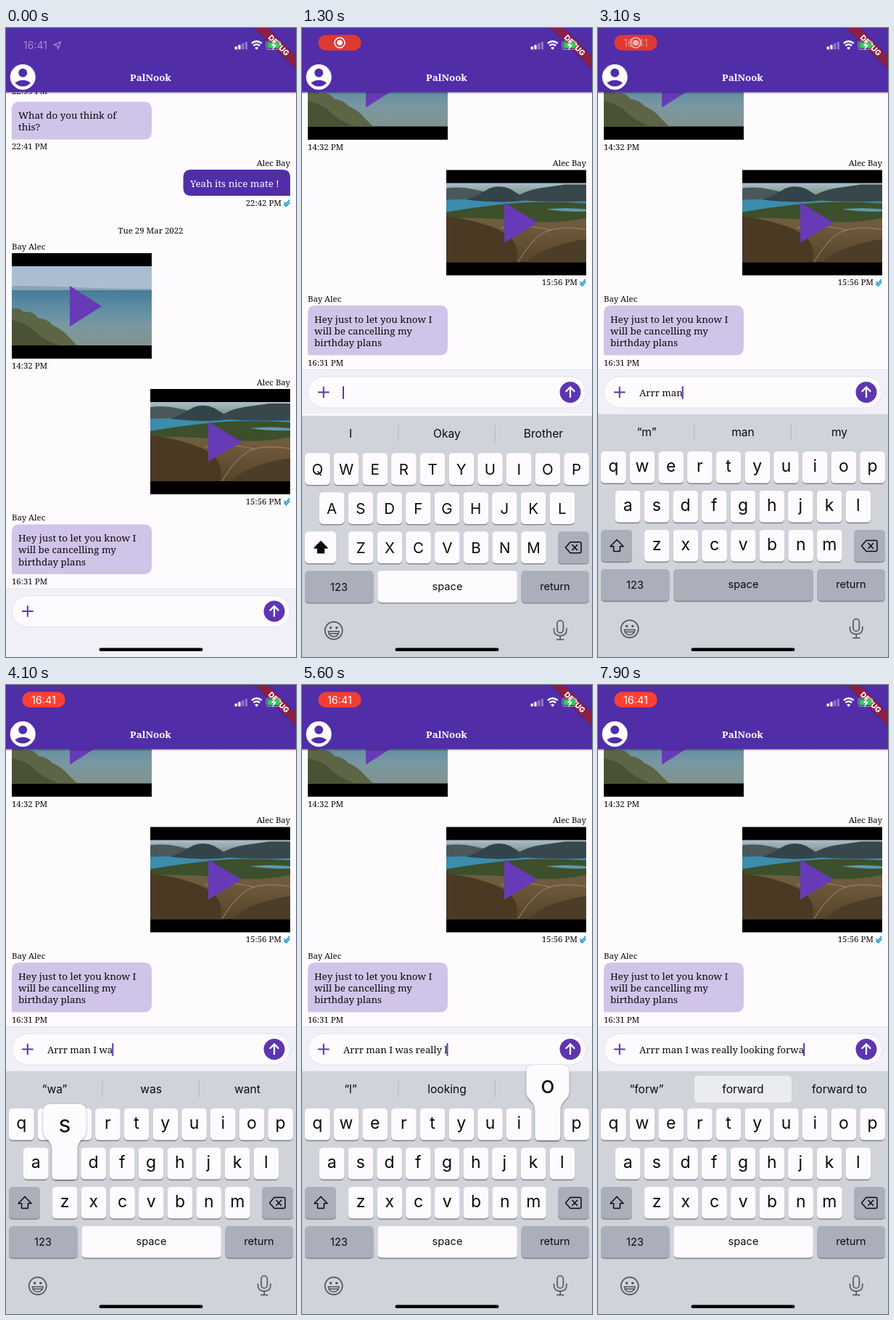
These frames come from a looping animation (400 px wide and 866 px high, 8 s). An HTML page:

```html
<!DOCTYPE html>
<html lang="en">
<head>
<meta charset="utf-8">
<title>Chat</title>
<style>
  html, body { margin: 0; width: 100%; height: 100%; overflow: hidden; background: #fefbff; }
  svg { display: block; width: 400px; height: 866px; }
  text { white-space: pre; }
  .serif { font-family: "Noto Serif", serif; font-size: 13.4px; font-weight: 500; fill: #0a0a0a; }
  .small { font-size: 11.4px; }
  .sans { font-family: Inter, "Liberation Sans", sans-serif; fill: #0b0b0d; }
  .mid { text-anchor: middle; }
  .end { text-anchor: end; }
</style>
</head>
<body>
<svg id="stage" viewBox="0 0 400 866"></svg>
<script>
const LOOP = 8000, LIFT = 301.5, OPEN = 915, PRESS = 110;
const PURPLE = '#5e35b1', HEADER = '#512da8', PAPER = '#fefbff', GREY = '#abafbb';

const MESSAGE = 'Arrr man I was really looking forwa';
// Commit time of each typed character, in hundredths of a second.
const STROKES = [165, 185, 202, 222, 242, 265, 282, 300, 317, 335, 352, 375, 395, 417, 435, 455, 470, 485,
  500, 512, 527, 542, 553, 567, 582, 597, 612, 627, 645, 667, 690, 715, 735, 755, 780].map(v => v * 10);
const HINTS = [
  [0, 'I', 'Okay', 'Brother'],
  [1700, '“A”', 'And', 'Are'],
  [1900, '“Ar”', 'Are', 'Art'],
  [2270, '“Arrr”', 'Are', 'Arrive'],
  [2470, 'I', 'man', 'that'],
  [2720, '“m”', 'man', 'my'],
  [3220, 'I', 'and', 'that'],
  [3400, 'I', 'I’m', 'I’ll'],
  [3570, 'was', 'am', 'have'],
  [3800, '“w”', 'was', 'will'],
  [4000, '“wa”', 'was', 'want'],
  [4220, '“was”', 'wasn’t', 'wash'],
  [4400, 'going', 'just', 'in'],
  [4600, '“r”', 'really', 'right'],
  [5320, '“really”', 'really', 'reality'],
  [5450, 'good', 'bad', 'hoping'],
  [5570, '“l”', 'looking', 'like'],
  [5720, '“lo”', 'looking', 'long'],
  [6020, '“look”', 'looking', 'looks'],
  [6500, '“looking”', 'looking', 'lookin'],
  [6700, 'forward', 'for', 'at'],
  [6930, 'forward', 'forward to', 'for'],
  [7200, '“fo”', 'forward', 'for'],
  [7400, '“for”', 'forward', 'forward to'],
  [7600, '“forw”', 'forward', 'forward to', true]
];

const text = (x, y, s, cls = '', extra = '') => `<text x="${x}" y="${y}" class="${cls}" ${extra}>${s}</text>`;
const rect = (x, y, w, h, fill, r = 0, extra = '') =>
  `<rect x="${x}" y="${y}" width="${w}" height="${h}" rx="${r}" fill="${fill}" ${extra}/>`;
const path = (d, fill, extra = '') => `<path d="${d}" fill="${fill}" ${extra}/>`;
const stroke = (d, color, w, extra = '') => path(d, 'none', `stroke="${color}" stroke-width="${w}" ${extra}`);
const circle = (x, y, r, fill, extra = '') => `<circle cx="${x}" cy="${y}" r="${r}" fill="${fill}" ${extra}/>`;
const gradient = (id, ...stops) => `<linearGradient id="${id}" x2="0" y2="1">` +
  stops.map(([o, c]) => `<stop offset="${o}" stop-color="${c}"/>`).join('') + '</linearGradient>';
const note = (x, y, s, cls = '') => text(x, y, s, 'serif small ' + cls);
const ticks = y => stroke(`M383.5 ${y}l2.5 2.5 5-6M383.5 ${y + 2.5}l3 3 5-6`, '#2196d8', 1.7);

function leftBubble(y, h, lines) {
  return path(`M8 ${y + 11}q0-11 11-11h171q11 0 11 11v${h - 22}q0 11-11 11H8z`, '#d1c4e9') +
    lines.map((s, i) => text(17, y + 23.5 + i * 16.3, s, 'serif')).join('');
}

const seaVideo = `<g transform="translate(8 310)">
  ${rect(0, 0, 193, 145.3, '#000')}${rect(0, 18, 193, 34, 'url(#sky)')}${rect(0, 50, 193, 77, 'url(#sea)')}
  ${path('M0 51V45q50 0 90 2t103 2v2z', '#8ba3b6')}
  ${path('M0 77q10-4 16 4q14-2 20 8q14 2 20 10q14 6 22 16l12 12H0z', '#5d6547')}
  ${path('M0 92q20 4 32 16t34 19H0z', '#4a5236')}
  ${path('M80 45l44 28-44 28z', '#673ab7')}</g>`;

const valleyVideo = `<g transform="translate(199 497)">
  ${rect(0, 0, 193, 145, '#000')}${rect(0, 18, 193, 109, 'url(#valley)')}
  ${path('M0 39h193v16q-50-3-95 1T0 59z', '#3c8cab')}
  ${path('M0 41V25q20-3 40 2l50 12z', '#4a585c')}
  ${path('M28 41q16-6 32-16q14-5 28 1l24 15q-30 6-84 0z', '#33434a')}
  ${path('M92 41q16-14 44-17l28-4h29v23q-50 2-101-2z', '#37474c')}
  ${path('M0 58q45-8 90-12t103 0v20q-40 9-90 4T0 66z', '#3d4f2b')}
  ${path('M138 54q25-3 55 0v3q-30 1-55-3z', '#5c9bae')}
  ${path('M0 64q40 4 72 18t24 45H0z', '#4a3a24')}
  ${path('M112 127q20-22 81-32v32z', '#4b3d28')}
  ${stroke('M193 82q-40-6-58 4t-36 41M75 80q35-6 70 3', '#8d7a60', 1.3)}
  ${path('M80 45l46 27.5-46 27.5z', '#673ab7')}</g>`;

const list = `
  ${note(8, 91, '22:39 PM')}
  ${leftBubble(101.5, 52, ['What do you think of', 'this?'])}
  ${note(8, 167, '22:41 PM')}
  ${note(392, 189.5, 'Alec Bay', 'end')}
  ${path('M244.5 206q0-11 11-11H381q11 0 11 11v25H255.5q-11 0-11-11z', HEADER)}
  ${text(254, 218.5, 'Yeah its nice mate !', 'serif', 'style="fill:#fff"')}
  ${note(380, 245, '22:42 PM', 'end')}${ticks(240)}
  ${note(199.5, 282.5, 'Tue 29 Mar 2022', 'mid')}
  ${note(8, 305, 'Bay Alec')}
  ${seaVideo}
  ${note(8, 469, '14:32 PM')}
  ${note(392, 491.5, 'Alec Bay', 'end')}
  ${valleyVideo}
  ${note(380, 655.5, '15:56 PM', 'end')}${ticks(651)}
  ${note(8, 678, 'Bay Alec')}
  ${leftBubble(683.5, 68.5, ['Hey just to let you know I', 'will be cancelling my', 'birthday plans'])}
  ${note(8, 766, '16:31 PM')}`;

const composer = `
  ${rect(0, 772, 400, 94, '#f1eff7')}${rect(0, 771.5, 400, 1, '#e6e3ec')}
  ${rect(8.5, 781.5, 383, 43, PAPER, 21.5, 'stroke="#e4e1ea"')}
  ${stroke('M22 803h15.6M29.8 795.2v15.6', PURPLE, 2)}
  ${circle(370, 803, 14.5, PURPLE)}
  ${stroke('M370 810.5v-14M363.8 802.3l6.2-6.3 6.2 6.3', '#fff', 2.3)}
  ${text(57, 808.5, '', 'serif', 'id="draft" style="font-size:13.2px"')}
  ${rect(56, 794.5, 2, 18, PURPLE, 1, 'id="caret"')}`;

const header = `
  ${rect(0, 88.5, 400, 3, 'url(#shade)')}${rect(0, 0, 400, 88.5, HEADER)}
  ${circle(23.2, 67.5, 17.5, '#fff')}
  <g transform="translate(2.2 46.5) scale(1.75)" fill="${HEADER}"><circle cx="12" cy="8.7" r="3.4"/>
  <path d="M12 19.4c-2 0-4.4-.8-6.2-2.9 1.7-1.3 3.9-2.1 6.2-2.1s4.5.8 6.2 2.1c-1.8 2.1-4.2 2.9-6.2 2.9z"/></g>
  ${text(199.5, 73, 'PalNook', 'serif mid', 'style="fill:#fff;font-weight:800;font-size:13.4px"')}
  <g transform="translate(400 0) rotate(45)">${rect(-45, 27, 90, 14, '#000', 0, 'opacity=".16"')}
  ${rect(-45, 27.6, 90, 12.4, '#b71c1c', 0, 'opacity=".63"')}
  ${text(0, 37.4, 'DEBUG', 'sans mid', 'style="fill:#fff;font-size:10.3px;font-weight:800"')}</g>
  <g id="clock">${text(24, 29, '16:41', 'sans', 'style="fill:#fff;font-size:14px"')}
  ${stroke('M75.5 19l-9.5 4.2 4.8 1.1 1 4.7z', '#fff', 1.3, 'stroke-linejoin="round"')}</g>
  <g id="pill">${rect(22.5, 9.5, 59, 21.5, '#f44336', 10.5, 'id="pillFill"')}
  <g id="record">${circle(52, 20.3, 7, 'none', 'stroke="#fff" stroke-width="1.5"')}${circle(52, 20.3, 3.8, '#fff')}</g>
  ${text(52, 25.5, '16:41', 'sans mid', 'id="pillTime" style="fill:#fff;font-size:14.5px"')}</g>
  ${[0, 1, 2, 3].map(i => rect(315.5 + i * 4.7, 25.5 - i * 2.2, 3.4, 4 + i * 2.2, '#fff', 0.8, `opacity="${i < 2 ? 1 : 0.35}"`)).join('')}
  ${stroke('M338.7 21.2q7-6 14 0M341.3 24.3q4.4-3.6 8.8 0', '#fff', 2.3)}
  ${path('M345.7 30l-2.6-2.8q2.6-2 5.2 0z', '#fff')}
  ${rect(359, 18, 20, 11.5, 'none', 3, 'stroke="#fff" stroke-opacity=".5"')}
  ${rect(360.7, 19.7, 16.6, 8.1, '#35c759', 1.8)}
  ${path('M371.5 17l-6 7.5h3.5l-2 6.5 6.5-8h-3.8z', '#fff')}`;

const keyAt = {};
const keyBox = (x, y, w, fill, id = '') =>
  rect(x, y + 1.2, w, 44, '#898b91', 5) + rect(x, y, w, 43.6, fill, 5, id && `id="${id}"`);

function letterRow(letters, firstX, y) {
  return [...letters].map((c, i) => {
    const x = firstX + i * 39.7;
    keyAt[c] = { x, y };
    return keyBox(x - 17.3, y, 34.6, PAPER) + text(x, 0, c, 'sans mid letter', `data-y="${y}"`);
  }).join('');
}

const label = (x, y, s) => text(x, y, s, 'sans mid', 'style="font-size:14.6px"');
const keyboard = `<g id="keyboard">
  ${rect(0, 531.5, 400, 336, '#d1d3da')}
  ${rect(133, 538, 134, 37, '#ebecef', 5, 'id="highlight"')}
  ${stroke('M132.8 544v24M266.3 544v24', '#b5b8c0', 1, 'id="dividers"')}
  ${[67, 200, 333].map(x => text(x, 562, '', 'sans mid hint', 'style="font-size:15.6px"')).join('')}
  ${letterRow('qwertyuiop', 21.3, 583)}${letterRow('asdfghjkl', 41.2, 637)}${letterRow('zxcvbnm', 81.2, 691)}
  ${keyBox(4, 691, 43, GREY, 'shiftKey')}
  ${path('M26 704.5l-9 9.2h4.6v6.8h8.8v-6.8h4.6z', 'none', 'id="shiftArrow" stroke="#0b0b0d" stroke-width="1.5" stroke-linejoin="round"')}
  ${keyBox(353, 691, 43, GREY)}
  ${stroke('M363.5 713l6.5-7.5h13q2 0 2 2v11q0 2-2 2h-13zM372.5 709l7.5 8M380 709l-7.5 8', '#0b0b0d', 1.5, 'stroke-linejoin="round"')}
  ${keyBox(4, 745, 94.5, GREY)}${keyBox(104.3, 745, 192.5, PAPER, 'spaceKey')}${keyBox(302.5, 745, 93.5, GREY)}
  ${label(51, 772.3, '123')}${label(200.5, 771.3, 'space')}${label(349, 771.3, 'return')}
  ${circle(43.7, 827.3, 12, 'none', 'stroke="#50535a" stroke-width="1.7"')}
  ${circle(39.6, 823.5, 1.7, '#50535a')}${circle(47.8, 823.5, 1.7, '#50535a')}
  ${stroke('M36.3 828.5h14.8q-1 7-7.4 7t-7.4-7zM37.5 831.5h12.4', '#50535a', 1.5)}
  ${rect(352, 813.5, 8.4, 17, 'none', 4.2, 'stroke="#50535a" stroke-width="1.6"')}
  ${stroke('M347.5 824v2.5q0 8 8.7 8t8.7-8V824M356.2 834.5v5M351 839.7h10.4', '#50535a', 1.6)}
  <g id="popup"><path id="popShape" fill="${PAPER}" filter="url(#soft)"/>
  ${text(0, 0, '', 'sans mid', 'id="popLetter" style="font-size:32px"')}</g></g>`;

const stage = document.getElementById('stage');
stage.innerHTML = `<defs>
  ${gradient('sky', [0, '#a6bdd2'], [1, '#aebfce'])}
  ${gradient('sea', [0, '#437b98'], [0.3, '#5c8ca2'], [0.65, '#7a98a2'], [1, '#82938f'])}
  ${gradient('valley', [0, '#a9c0cd'], [0.3, '#5a6742'], [0.55, '#715a3b'], [1, '#54432b'])}
  ${gradient('shade', [0, '#00000066'], [0.4, '#00000022'], [1, '#00000000'])}
  <filter id="soft" x="-20%" y="-20%" width="140%" height="140%"><feDropShadow dx="0" dy="1" stdDeviation="1.8" flood-opacity=".4"/></filter></defs>
  ${rect(0, 0, 400, 866, PAPER)}<g id="body">${list}${composer}</g>
  ${rect(0, 531, 400, 335, PAPER, 0, 'id="gap"')}${header}${keyboard}
  ${rect(128.5, 853.5, 143, 4.6, '#000', 2.3)}`;

const $ = id => document.getElementById(id);
const show = (el, on) => el.setAttribute('visibility', on ? 'inherit' : 'hidden');
const letters = [...stage.querySelectorAll('.letter')];
const hints = [...stage.querySelectorAll('.hint')];
const ramp = (t, from, to) => Math.min(1, Math.max(0, (t - from) / (to - from)));

function drawStatus(t) {
  $('clock').setAttribute('opacity', 0.45 * (1 - ramp(t, 0, 250)));
  $('pill').setAttribute('opacity', ramp(t, 250, 600));
  const glow = (1 - Math.cos((t - 1300) / 1900 * 2 * Math.PI)) / 2;
  const mix = (a, b) => Math.round(a + (b - a) * glow);
  $('pillFill').setAttribute('fill', `rgb(${mix(222, 255)},${mix(58, 65)},${mix(50, 53)})`);
  const swap = ramp(t, 2950, 3350);
  $('record').setAttribute('opacity', 1 - swap);
  $('pillTime').setAttribute('opacity', swap);
}

function drawPopup(char, upper) {
  const key = keyAt[char.toLowerCase()];
  show($('popup'), !!key);
  if (!key) return;
  const { x, y } = key, head = Math.min(367, Math.max(33, x));
  const l = head - 29.5, r = head + 29.5, kl = x - 17.3, kr = x + 17.3, top = y - 60;
  $('popShape').setAttribute('d', `M${l + 10} ${top}H${r - 10}Q${r} ${top} ${r} ${top + 10}V${top + 36}
    C${r} ${top + 49} ${kr} ${top + 48} ${kr} ${top + 63}V${y + 39}Q${kr} ${y + 44} ${kr - 5} ${y + 44}
    H${kl + 5}Q${kl} ${y + 44} ${kl} ${y + 39}V${top + 63}C${kl} ${top + 48} ${l} ${top + 49} ${l} ${top + 36}
    V${top + 10}Q${l} ${top} ${l + 10} ${top}Z`);
  const glyph = $('popLetter');
  glyph.setAttribute('x', head);
  glyph.setAttribute('y', y - 21.5);
  glyph.textContent = upper ? char.toUpperCase() : char.toLowerCase();
}

function drawKeyboard(t, count) {
  const spring = 0.0183 * (t - OPEN);
  const drop = 336 * (1 + spring) * Math.exp(-spring);
  show($('keyboard'), t >= OPEN);
  $('keyboard').setAttribute('transform', `translate(0 ${drop.toFixed(2)})`);

  const upper = count === 0;
  letters.forEach(el => {
    const c = el.textContent;
    el.textContent = upper ? c.toUpperCase() : c.toLowerCase();
    el.setAttribute('y', +el.dataset.y + (upper ? 29.7 : 28.3));
    el.style.fontSize = upper ? '20.5px' : '23px';
  });
  $('shiftKey').setAttribute('fill', upper ? PAPER : GREY);
  $('shiftArrow').setAttribute('fill', upper ? '#0b0b0d' : 'none');

  const pressed = count < MESSAGE.length && t >= STROKES[count] - PRESS ? MESSAGE[count] : '';
  $('spaceKey').setAttribute('fill', pressed === ' ' ? GREY : PAPER);
  drawPopup(pressed, upper);

  const hint = HINTS.filter(h => h[0] <= t).pop();
  hints.forEach((el, i) => { el.textContent = hint[i + 1]; });
  show($('highlight'), hint[4]);
  show($('dividers'), !hint[4]);
}

function render(t) {
  const open = t >= OPEN;
  const count = STROKES.filter(s => s <= t).length;
  $('body').setAttribute('transform', `translate(0 ${open ? -LIFT : 0})`);
  show($('gap'), open);
  $('draft').textContent = MESSAGE.slice(0, count);
  $('caret').setAttribute('x', 56 + (count ? $('draft').getComputedTextLength() : 0));
  show($('caret'), open);
  drawStatus(t);
  drawKeyboard(t, count);
}

const start = performance.now();
function tick() {
  render((performance.now() - start) % LOOP);
  requestAnimationFrame(tick);
}
tick();
</script>
</body>
</html>
```
